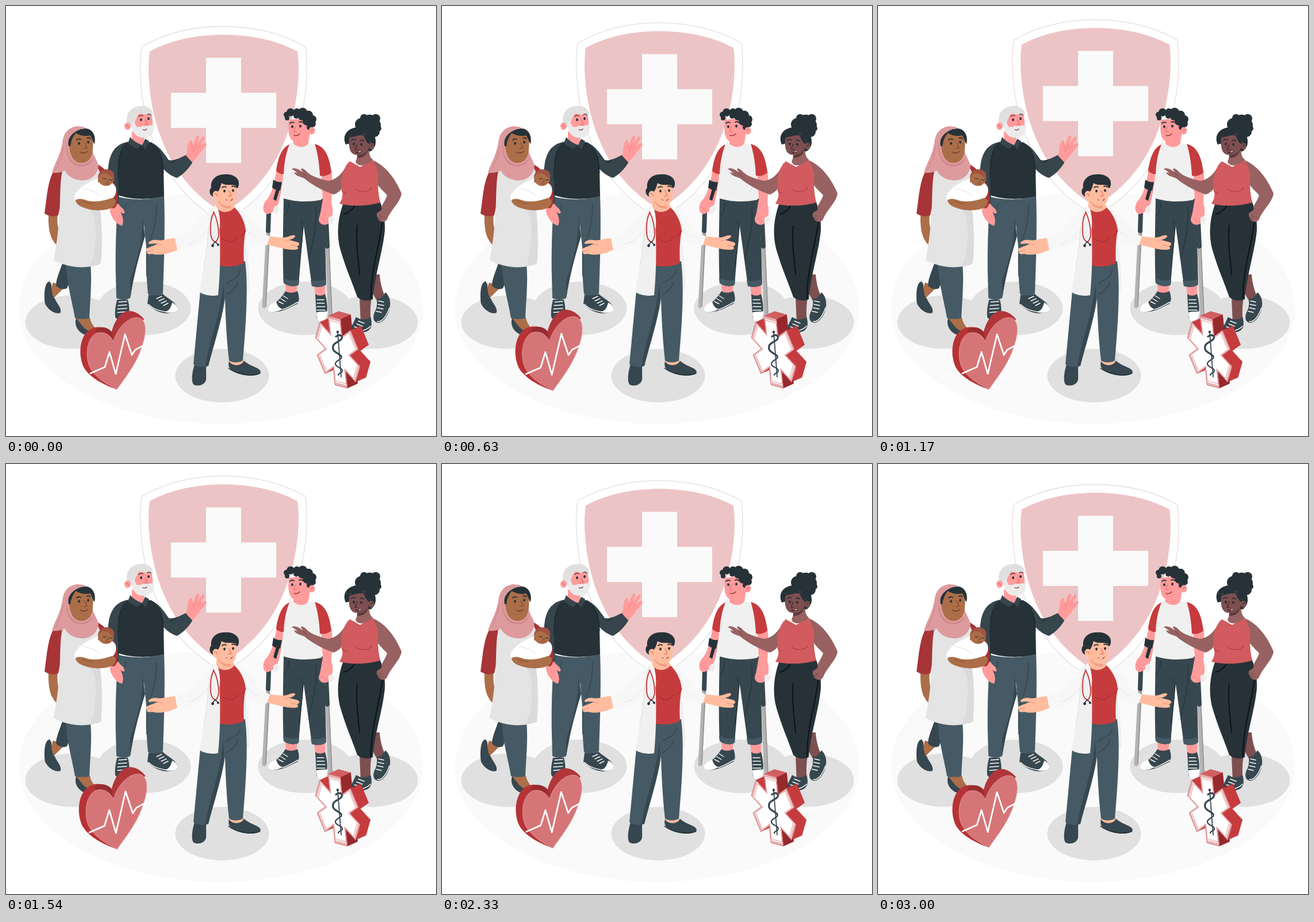
These frames come from a looping animation (748 px wide and 748 px high, 3040 ms). An HTML page with a canvas:

```html
<!DOCTYPE html>
<html lang="en">
<head>
<meta charset="utf-8">
<title>Health care team</title>
<style>
html, body { margin: 0; width: 100%; height: 100%; overflow: hidden; background: #fff; }
canvas { display: block; }
</style>
</head>
<body>
<canvas id="stage" width="748" height="748"></canvas>
<script>
const SIZE = 748, LOOP = 3040, CYCLE = 3000, BEAT = CYCLE / 2, LIFT = 15;
const stage = document.getElementById('stage').getContext('2d');
const INK = '#263238', SLATE = '#455a64', STEEL = '#37474f', RED = '#c63c3e', WINE = '#a73437';
const PINK = '#ff9b9b', PEACH = '#ffbc9e', TAN = '#ab6e48', BROWN = '#7d4f50', ROSEWOOD = '#976261';
let g = stage;

function fill(color, d) {
  g.fillStyle = color;
  g.fill(new Path2D(d));
}
function line(color, width, d) {
  g.strokeStyle = color;
  g.lineWidth = width;
  g.lineCap = g.lineJoin = 'round';
  g.stroke(new Path2D(d));
}
function oval(color, x, y, rx, ry = rx, turn = 0) {
  g.fillStyle = color;
  g.beginPath();
  g.ellipse(x, y, rx, ry, turn, 0, Math.PI * 2);
  g.fill();
}
function eyes(x1, y1, x2, y2, brow = INK) {
  oval(INK, x1, y1, 1.9, 2.4);
  oval(INK, x2, y2, 1.9, 2.4);
  line(brow, 1.8, `M${x1 - 4} ${y1 - 6}q3 -3 7 -1M${x2 - 2} ${y2 - 7}q4 -2 6 1`);
}

function drawShield() {
  const rim = 'M378 35.5C327 35.5 277 47 236 71C233 92 233 113 234.5 130C240 225 280 325 378 376C476 325 517 225 522.5 130C524 113 523 92 521 71C480 47 429 35.5 378 35.5Z';
  fill('#fff', rim);
  line('#e0e0e0', 1.3, rim);
  fill('#edc4c5', 'M378 50C331 50 287 59 250 79C247 100 248 120 249 133C256 225 295 312 378 360C461 312 501 225 508 133C509 120 510 100 507 79C470 59 425 50 378 50Z');
  fill('#fafafa', 'M348 90H409V151H470V212H409V273H348V212H287V151H348Z');
}

function drawOldMan() {
  // shoes
  fill(STEEL, 'M193 511L212 511C215 522 216 538 211 546C205 551 194 548 190 541C189 530 191 520 193 511Z');
  fill(STEEL, 'M248 502C261 505 270 501 273 501C281 509 296 515 298 525C299 532 287 536 274 534C262 532 251 524 246 518Z');
  fill('#fff', 'M289 516C297 519 300 526 297 530C291 535 280 534 276 532C284 531 287 524 289 516Z');
  line('#fff', 1.4, 'M196 515l14 -1M195 521l15 -1M194 527l16 -1M194 533l14 -1M262 509l9 -4M266 513l9 -4M270 517l9 -4M274 521l8 -4M248 519C257 529 275 533 288 532');
  // trousers
  fill(SLATE, 'M196 332C192 365 190 420 191 470L192 508C199 512 210 512 216 508C222 470 233 425 240 380L244 420C243 450 245 480 247 501C255 505 267 504 273 500C275 450 277 380 275 331C250 338 220 338 196 332Z');
  fill(STEEL, 'M237 366C239 391 234 426 216 478L216 508C222 470 230 440 242 400Z');
  line(STEEL, 1.5, 'M262 345C262 380 253 402 247 420C244 440 244 455 245 470M208 344q-1 15 -9 22');
  // hand and arm on the left
  fill(PINK, 'M180 338L195 340C194 348 204 350 206 357C208 362 203 362 199 358C204 367 205 376 202 382C194 381 184 370 181 358Z');
  const sleeve = '#37454c';
  fill(sleeve, 'M213 236C196 239 184 248 179 272C175 300 174 326 180 344C186 347 192 346 196 343L200 262Z');
  // jumper
  fill(sleeve, 'M252 237C268 244 276 258 283 268C292 270 304 264 315 258C321 262 325 268 324 273C317 284 306 295 297 299C285 295 277 287 268 278Z');
  fill(INK, 'M214 236C202 240 198 252 195 272L195 329C220 338 253 337 275 331L274 283C274 262 266 244 252 237Z');
  line('#182226', 1, 'M274 290C273 273 271 260 264 249M195 300C195 280 196 265 201 253M297 267q-5 5 -11 6');
  fill(PINK, 'M219 218L219 239C225 245 233 246 240 239L241 225Z');
  fill(sleeve, 'M216 228L212 239L228 249L236 242L243 250L249 235L242 231L237 242C229 239 222 235 216 228Z');
  // raised hand
  fill(PINK, 'M313 260C317 252 314 243 318 237C321 231 324 232 324 239L325 242C328 233 332 224 335 225C338 227 334 234 332 240C337 233 342 225 345 227C348 229 342 237 338 243C343 239 348 237 349 240C349 244 342 250 338 255C334 263 328 267 324 272Z');
  line('#ed7e80', 1, 'M323 242q6 4 3 12M332 240l-4 6M338 243l-6 6');
  // head
  fill(PINK, 'M217 189C217 210 222 226 237 227C251 227 256 216 255 200L253 185Z');
  fill('#e0e0e0', 'M212 208C206 190 215 175 234 174C246 172 258 181 255 191C248 192 239 187 231 187C228 194 225 196 224 205L219 211Z');
  fill('#ebebeb', 'M219 202C223 202 225 205 227 210C234 212 239 206 246 209C251 206 254 209 257 206C259 220 252 229 241 229C227 230 218 221 219 202Z');
  oval(PINK, 211.5, 209, 5.5, 6.5);
  eyes(235, 198, 248, 196, '#8b3d40');
  line('#ec7173', 1.5, 'M242 198l4 8l-5 1M209 208q3 -1 4 3');
  line('#7b3638', 1.3, 'M238 215q4 2 7 -1');
}

function drawMother() {
  // back foot
  fill(TAN, 'M82 481C78 490 77 500 82 509L97 494L105 489Z');
  fill(STEEL, 'M76 479C66 480 66 505 68 518C74 531 90 538 95 533C97 525 88 517 85 509C80 505 79 493 79 484Z');
  // front foot
  fill(TAN, 'M121 541L146 542C147 553 157 562 163 570L150 575L128 558Z');
  fill(STEEL, 'M122 543C118 555 125 566 135 571C145 574 156 577 160 573C154 568 143 567 135 559C130 554 127 548 122 543Z');
  fill(STEEL, 'M99 445C94 460 87 475 87 486C91 492 101 494 106 491C112 478 116 468 121 452Z');
  fill(SLATE, 'M104 449C106 485 115 513 120 543C128 545 138 545 145 543C146 514 150 480 147 450Z');
  // sleeves and arm on the left
  fill(TAN, 'M74 358C73 380 75 398 82 408C86 417 93 417 97 412C98 405 97 396 93 391C89 384 89 372 90 360Z');
  fill(WINE, 'M97 275C82 280 75 300 71 330L67 361C74 366 84 367 91 364L102 310Z');
  fill(WINE, 'M154 272C175 283 188 300 192 321C196 335 194 349 188 352C180 351 170 347 162 343Z');
  // tunic
  fill('#e4e4e4', 'M99 283C93 305 95 335 93 360C91 395 87 420 83 442C105 455 140 459 165 448C168 420 167 385 164 355C162 330 171 295 158 279Z');
  fill('#dbdbdb', 'M164 355C167 385 168 420 165 448C160 451 153 452 146 453C155 430 158 400 155 378C154 366 150 358 146 353Z');
  // baby
  fill('#fff', 'M119 336C116 325 136 308 160 300C173 301 184 305 190 313C194 322 190 334 180 338C160 344 140 346 125 343Z');
  line('#dedede', 1, 'M134 317C145 320 156 322 163 330');
  oval(TAN, 174, 299, 14);
  fill('#a25443', 'M160 298C161 286 171 282 180 285C188 287 190 295 187 302C183 296 178 292 171 291C166 291 164 294 160 298Z');
  oval(TAN, 163, 304, 3.2);
  line(INK, 1.1, 'M169 300q3 2 5 0M180 302q3 2 5 0');
  line('#753f2d', 1, 'M177 302l1 4h-3M173 309q3 2 6 0');
  fill(TAN, 'M121 338C127 333 136 337 143 339C158 342 172 338 184 334C194 336 192 344 186 350C171 358 148 356 136 351C128 349 121 343 121 338Z');
  line('#85502f', 1, 'M133 340q9 4 17 4');
  // head
  fill('#dd9b9e', 'M126 209C108 210 100 222 98 238C94 262 84 274 80 290C90 291 98 289 102 286C108 299 125 305 138 303C151 301 160 291 161 277C156 264 150 254 145 241Z');
  fill('#d18589', 'M107 228C103 251 109 268 124 275C138 279 147 271 152 263C149 275 138 281 125 278C108 273 101 253 107 228Z');
  fill(TAN, 'M111 225C108 245 111 266 125 272C140 276 150 266 151 250C152 238 152 228 147 222L127 218Z');
  fill(INK, 'M109 244C106 226 115 213 132 214C147 209 158 223 154 240C150 236 151 230 146 225C136 228 127 224 121 221C116 228 113 235 112 244Z');
  fill('#dd9b9e', 'M139 212C124 206 106 211 100 228L108 240C108 225 122 215 139 212Z');
  eyes(127, 239, 143, 237);
  line('#8a4b36', 1.5, 'M137 238l4 9l-5 1');
  line('#70382c', 1.3, 'M129 254q7 4 13 -1');
  line('#cd8186', 1, 'M100 244C97 265 90 276 86 285');
}

function drawCrutchMan() {
  // crutches
  line('#b3b3b3', 7, 'M456 392L449 522M559 420L564 540');
  line('#8f8f8f', 1.5, 'M458 394L452 522M562 422L567 537');
  line(STEEL, 8, 'M457 360L456 391M557 375L559 418');
  // shoes and ankles
  fill(PINK, 'M486 482L507 484L505 502L487 500ZM536 484L555 484L555 505L538 505Z');
  fill(STEEL, 'M486 496C492 500 501 499 507 496C510 504 511 513 507 518C494 524 478 534 463 532C454 529 455 523 463 519C473 514 480 506 486 496Z');
  fill('#fff', 'M470 514C472 522 476 526 481 527C474 532 462 534 457 530C453 524 462 517 470 514Z');
  line('#fff', 1.4, 'M482 504l8 5M478 509l8 5M474 514l8 4M481 528C491 525 500 519 508 515');
  fill(STEEL, 'M538 501C543 505 551 504 555 501C558 512 560 525 558 535L552 547C546 549 540 545 540 538Z');
  fill('#fff', 'M540 533C546 531 554 532 559 531C558 543 552 551 545 548C541 545 540 539 540 533Z');
  line('#fff', 1.4, 'M541 511h12M541 517h13M541 523h14M541 529h14');
  // trousers
  fill(STEEL, 'M483 335C482 380 481 440 483 482C490 488 503 489 509 485C512 450 514 420 518 383C523 420 528 455 532 487C540 490 553 489 557 484C556 440 555 390 551 335Z');
  fill(SLATE, 'M482 473q14 7 28 3L509 485C503 489 490 488 483 482ZM530 477q14 4 27 -3L557 484C553 489 540 490 532 487Z');
  line(INK, 1.2, 'M514 372C519 400 512 425 510 455M539 350C542 385 533 410 527 440M492 343q-1 15 -7 22');
  // arms
  fill(PINK, 'M471 282L483 287C481 309 479 325 475 339C474 349 463 362 454 362C446 360 446 347 451 340C460 332 467 312 471 282Z');
  fill(PINK, 'M548 290L566 285C569 305 567 328 566 343C570 354 569 372 560 379C550 384 541 376 545 367C548 359 549 345 551 337Z');
  fill(INK, 'M465 302C470 306 475 307 480 306L477 321C472 321 467 319 463 316ZM470 318L476 319L470 339L465 336Z');
  fill('#eee', 'M465 351l6 -4l5 6l-5 9l-6 -2ZM561 368l7 -3l4 6l-4 7h-7Z');
  line('#ed7e80', 1, 'M450 349q6 3 10 9M548 369q6 1 10 8');
  // shirt
  fill('#f0f0f0', 'M495 238C484 245 482 264 482 284L481 334C505 342 530 341 549 337C551 315 549 299 547 280C546 259 541 247 533 239L512 244Z');
  line('#d9d9d9', 1, 'M546 296C545 309 540 316 535 323M483 294q2 -11 6 -18');
  fill(RED, 'M493 241C480 246 473 263 470 287C474 291 479 293 483 292C484 272 487 256 493 241Z');
  fill(RED, 'M537 240C555 244 563 262 566 290C560 295 552 297 546 295C545 274 542 255 537 240Z');
  fill(PINK, 'M500 226L500 240C510 248 521 246 526 239L529 219Z');
  // head
  fill(PINK, 'M492 198C490 221 492 233 503 236C517 238 528 229 531 216L530 194Z');
  [[488, 189, 5], [495, 185, 7], [506, 184, 6], [516, 185, 8], [526, 190, 8], [533, 197, 7], [533, 205, 6],
   [505, 191, 5], [515, 192, 7], [524, 200, 8], [528, 211, 5], [489, 195, 4]].forEach(c => oval(INK, ...c));
  oval(PINK, 532, 217, 5.5, 6.5);
  eyes(498, 210, 512, 209);
  line('#ed7477', 1.5, 'M504 210l-4 8l5 1M530 218q1 -4 5 -2');
  line('#963c3f', 1.4, 'M501 225q6 2 10 -3');
}

function drawGuest() {
  // feet
  fill(BROWN, 'M615 506L636 506C634 520 633 535 635 548L617 552Z');
  fill(BROWN, 'M640 467L638 500L647 516L659 504C655 495 651 483 650 467Z');
  fill(STEEL, 'M609 541C618 547 628 546 634 541C638 553 636 562 628 566C620 569 610 571 603 568L601 558Z');
  fill(STEEL, 'M646 508C651 511 655 506 660 498C668 505 670 516 667 528C664 540 655 552 646 551C637 548 638 538 643 529C646 522 645 515 646 508Z');
  line('#fff', 1.4, 'M613 548l10 4M610 553l10 4M606 558l10 3M648 513l9 2M647 519l10 2M646 525l10 2M644 531l9 2M667 525C662 540 654 550 646 549M634 557q-7 8 -25 10');
  // trousers
  fill(INK, 'M588 340C576 370 575 400 582 425C591 456 602 480 611 506C618 513 631 514 638 510C641 470 656 425 659 390C660 370 655 350 650 339Z');
  line('#0c1316', 2, 'M611 382C608 412 613 442 615 467M657 354C655 401 634 455 635 509M588 362q13 -4 18 -14');
  // arms
  fill(ROSEWOOD, 'M594 273C587 290 575 303 560 304C546 301 531 296 524 289C520 284 514 281 513 284L517 290C509 283 500 280 497 284C501 285 504 288 507 291L501 289C503 296 513 297 519 300C533 312 553 322 570 328C583 324 590 310 595 300Z');
  fill(ROSEWOOD, 'M637 268C659 276 678 301 688 326C687 340 669 355 663 371C657 380 646 374 645 364C643 358 652 358 654 353C650 350 660 340 663 329C656 322 648 314 643 306Z');
  line('#6a4244', 1, 'M649 363l6 4M646 367l6 4M516 291q4 2 6 6');
  // top
  fill('#d15b5e', 'M598 270C586 282 581 300 584 320C588 332 582 340 580 344C605 350 634 347 651 342C648 327 647 320 647 306C650 291 644 278 637 268L616 280Z');
  line('#ad3d43', 1.2, 'M609 319C618 325 632 324 636 316M584 320q3 5 8 6');
  fill(ROSEWOOD, 'M612 252L610 266C604 274 616 281 626 275C636 270 638 269 638 267C632 263 631 254 632 244Z');
  fill('#5e393c', 'M612 253C617 260 626 257 631 247C630 258 621 265 611 264Z');
  // head
  [[632, 202, 13], [618, 206, 11], [641, 207, 11], [643, 196, 8], [623, 195, 7], [634, 193, 4], [648, 213, 5],
   [641, 219, 9], [626, 219, 13]].forEach(c => oval(INK, ...c));
  fill(INK, 'M591 241C584 225 594 213 610 211C629 207 644 220 643 237C643 245 637 253 632 253L614 235Z');
  fill(BROWN, 'M598 226C595 244 597 257 609 259C624 261 633 250 634 237L625 222C616 221 606 225 598 226Z');
  fill(INK, 'M594 230C605 222 617 219 630 225L634 241C628 239 625 233 622 225C614 224 604 228 594 230Z');
  oval(BROWN, 636, 244, 4.5, 6);
  eyes(605, 240, 618, 241);
  line('#4f2b2e', 1.5, 'M611 240l-4 9l5 1M635 244q1 -3 3 -2');
  line('#3f2528', 1.4, 'M608 254q6 3 10 -1');
  line('#fff', 1.2, 'M614 254l3 -1');
}

function drawDoctor() {
  // shoes
  fill(PEACH, 'M389 613L412 613L417 625L390 625Z');
  fill(STEEL, 'M328 623C323 639 322 655 327 659C335 662 345 659 348 650C349 640 347 631 349 624Z');
  fill(INK, 'M324 647C323 663 344 664 348 649C347 662 324 666 324 647Z');
  fill(STEEL, 'M388 618C384 631 395 637 409 641C425 645 440 643 443 637C443 629 426 628 414 617C410 627 393 627 388 618Z');
  line(INK, 1.4, 'M387 630C399 640 427 645 442 639');
  // coat behind the shirt, then trousers
  fill('#f0f0f0', 'M410 377C419 405 424 460 423 494L415 497L405 440Z');
  fill(SLATE, 'M338 495L326 623C333 628 343 629 352 626C361 592 376 545 381 509C382 545 384 583 388 617C395 621 404 621 412 617C417 560 422 490 416 444L371 445Z');
  fill(STEEL, 'M378 483C383 520 371 550 352 626L347 627C353 584 374 535 378 483Z');
  line(STEEL, 1.5, 'M407 458q1 13 -24 24M403 480q-3 13 -19 22');
  // hands
  fill(PEACH, 'M298 404C285 403 273 409 262 407C254 406 247 410 248 414C255 413 260 413 264 414L246 421C242 424 243 427 246 427C243 430 247 433 254 431C266 435 284 431 299 424Z');
  fill(PEACH, 'M456 401C470 401 480 404 488 402C494 400 502 397 503 400C503 404 495 406 493 407L508 411C512 414 510 417 506 418C510 421 508 424 502 424C489 425 472 419 454 415Z');
  line('#e9937b', 1, 'M264 414q5 0 8 3M247 427l9 -3M493 407q-5 0 -8 2M505 418l-9 -2');
  // sleeves
  fill('#f7f7f7', 'M364 348C345 359 331 379 318 391C310 399 301 402 294 404L298 425C317 423 331 420 341 411L359 391Z');
  fill('#f7f7f7', 'M396 347C414 353 429 371 441 389C447 397 455 399 459 401L454 416C441 419 426 413 416 404L400 375Z');
  line('#e4e4e4', 1, 'M351 390C341 401 333 411 318 414M417 385C423 397 430 401 438 402');
  // shirt and coat
  fill(RED, 'M368 351L397 350C409 361 416 377 417 391C413 410 413 430 414 447C400 454 385 454 372 452Z');
  line('#a62e32', 1.2, 'M377 405C387 413 398 412 402 401M417 391q-5 9 -11 10');
  fill('#f0f0f0', 'M365 347C351 355 354 378 351 399C348 440 340 470 337 498C347 504 359 505 369 503C372 470 373 440 372 404C372 382 368 362 365 347Z');
  fill('#f7f7f7', 'M366 344L359 359L367 376L372 388C373 371 371 357 366 344Z');
  line('#dcdcdc', 1, 'M353 384C350 407 349 433 344 452');
  // stethoscope
  line(RED, 1.9, 'M361 358C366 368 370 382 370 398C369 405 367 409 364 411C359 408 356 402 356 394C355 380 357 368 361 360');
  line(INK, 1.5, 'M359 416L364 410L369 415');
  oval(INK, 359.5, 417, 2.4);
  oval(INK, 369, 415.5, 2);
  // head
  fill(PEACH, 'M366 333L366 350C374 362 390 360 398 350L389 334Z');
  fill('#f09f86', 'M369 340C374 350 382 354 391 352L391 341Z');
  fill(PEACH, 'M367 312C366 334 370 347 385 348C397 348 402 337 401 320L400 307Z');
  fill(INK, 'M364 332C354 332 352 321 357 316C355 303 365 293 379 293C394 291 407 299 405 311C404 317 401 320 399 312C389 310 382 313 375 308C372 318 370 324 366 324Z');
  oval(PEACH, 365, 328, 5.5, 6.5);
  eyes(380, 322, 395, 321);
  line('#e77b69', 1.5, 'M388 321l4 9l-5 1M363 327q4 -1 4 3');
  line('#a04140', 1.4, 'M383 337q6 4 11 -1');
  line('#fff', 1.2, 'M385 338l5 1');
}

function starPoints(scale) {
  const pts = [], w = 0.29;
  const put = (x, y) => pts.push([577 + scale * (37 * x - 6 * y), 602 + scale * (10 * x - 60 * y)]);
  for (let i = 0; i < 6; i++) {
    const a = Math.PI / 2 - i * Math.PI / 3, c = Math.cos(a), s = Math.sin(a), m = a - Math.PI / 6;
    put(c - s * w, s + c * w);
    put(c + s * w, s - c * w);
    put(2 * w * Math.cos(m), 2 * w * Math.sin(m));
  }
  return pts;
}
const poly = pts => 'M' + pts.map(p => p.join(' ')).join('L') + 'Z';

function drawStar() {
  const front = starPoints(1), dx = 18, dy = -8;
  const back = front.map(([x, y]) => [x + dx, y + dy]);
  fill(RED, poly(back));
  front.forEach((a, i) => {
    const j = (i + 1) % front.length, b = front[j];
    const nx = b[1] - a[1], ny = a[0] - b[0];
    if (nx * dx + ny * dy <= 0) return;
    const shade = Math.abs(ny) < 6 ? '#96292d' : ny < -18 ? '#d15f62' : RED;
    fill(shade, poly([a, b, back[j], back[i]]));
  });
  fill('#e8b1b2', poly(front));
  line('#d67577', 1, poly(front));
  fill('#fff', poly(starPoints(0.92)));
  line('#d67577', 0.8, poly(starPoints(0.88)));
  // staff and snake
  line(STEEL, 1.8, 'M577 568L583 645');
  oval(STEEL, 577, 567, 2.3);
  line(STEEL, 3.2, 'M574 575C582 569 588 576 582 581C573 587 567 588 569 597C571 603 579 604 583 609');
  line(STEEL, 2.2, 'M583 609C587 615 572 616 573 623C574 629 586 629 585 635C584 639 578 638 578 642');
}

function drawHeart(scale) {
  g.save();
  g.translate(186, 598.5);
  g.scale(scale, scale);
  g.translate(-186, -598.5);
  fill('#b73236', 'M193 667C175 661 146 648 135 628C125 606 128 573 147 562C159 555 173 559 184 567C188 550 198 533 211 531C223 529 234 537 240 545L214 570L187 584Z');
  fill('#982c30', 'M164 559C174 558 181 563 184 567L187 584C183 575 173 568 160 569C152 566 156 561 164 559Z');
  fill('#b0363a', 'M184 567C188 550 198 533 211 531C223 529 234 537 240 545C222 536 195 554 187 584Z');
  const face = 'M193 667C179 660 152 646 144 624C137 602 143 575 158 569C172 565 183 574 187 584C192 564 209 543 226 542C242 541 246 560 239 584C229 621 208 645 193 667Z';
  fill('#d67577', face);
  line('#e5a0a1', 0.8, face);
  line('#fff', 2.7, 'M147 639L172 628L180 602L191 640L207 571L219 607L225 598L240 590');
  g.restore();
}

function layer(draw) {
  const c = document.createElement('canvas');
  c.width = c.height = SIZE;
  g = c.getContext('2d');
  draw();
  g = stage;
  return c;
}
const people = layer(() => {
  [[115, 550], [240, 526], [520, 526], [635, 550], [376, 643]].forEach(([x, y]) => oval('#e0e0e0', x, y, 81.5, 46.5));
  drawOldMan();
  drawMother();
  drawCrutchMan();
  drawGuest();
  drawDoctor();
  drawStar();
});

// CSS "ease" curve, solved by bisection
function ease(x) {
  let lo = 0, hi = 1, u = 0.5;
  for (let i = 0; i < 18; i++) {
    u = (lo + hi) / 2;
    if (0.75 * u * (1 - u) + u * u * u < x) lo = u; else hi = u;
  }
  const v = 1 - u;
  return 0.3 * v * v * u + 3 * v * u * u + u * u * u;
}
function heartScale(t) {
  const p = t % BEAT / BEAT;
  const keys = [[0, 1], [0.1, 1.1], [0.3, 1], [0.4, 1], [0.5, 1.1], [0.6, 1], [1, 1]];
  const i = keys.findIndex(k => k[0] > p);
  const [a, from] = keys[i - 1], [b, to] = keys[i];
  return from + (to - from) * ease((p - a) / (b - a));
}

function frame(now) {
  // the cycle rests for a moment before the loop restarts
  const t = Math.min(now % LOOP, CYCLE);
  g.fillStyle = '#fff';
  g.fillRect(0, 0, SIZE, SIZE);
  oval('#fafafa', 374, 525.5, 352, 201.5);
  g.save();
  g.translate(0, -LIFT * (1 - Math.abs(1 - 2 * t / CYCLE)));
  drawShield();
  g.restore();
  g.drawImage(people, 0, 0);
  drawHeart(heartScale(t));
}

const start = performance.now();
function tick() {
  frame(performance.now() - start);
  requestAnimationFrame(tick);
}
tick();
</script>
</body>
</html>
```
